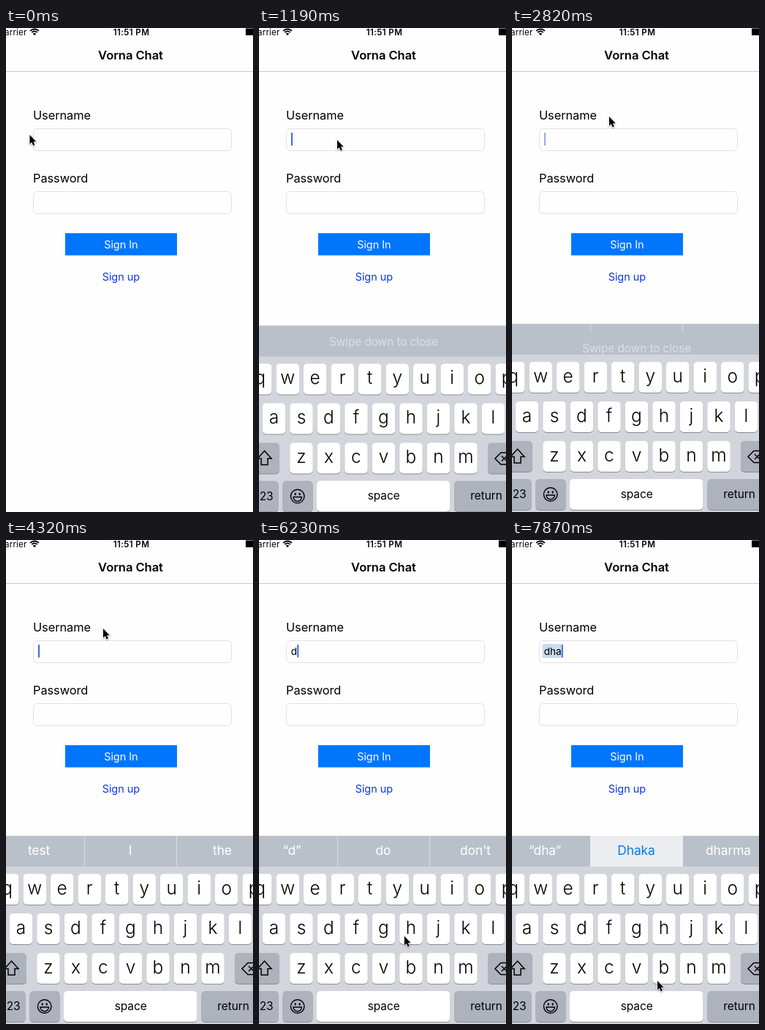
Recreate the animation shown at these times as an HTML page with a canvas. Size 338 by 661 pixels, loop 8000 ms.

```html
<!DOCTYPE html>
<html lang="en">
<head>
<meta charset="utf-8">
<title>Sign in</title>
<style>
html, body { margin: 0; width: 100%; height: 100%; overflow: hidden; background: #fefefe; }
canvas { display: block; }
</style>
</head>
<body>
<canvas id="stage" width="338" height="661"></canvas>
<script>
const ctx = document.getElementById('stage').getContext('2d');
const LOOP = 8000, STEP = 148.5;
const BAR = '#bac0c9', BOARD = '#d2d5db', DARK = '#adb2bd';

// Pointer stops: step, x, y
const PATH = [
  [0, 32.5, 146], [2, 107, 153], [9, 107, 153], [13, 133, 121], [29, 133, 121],
  [31, 146, 160], [36, 98, 516], [37, 95, 526], [39, 95, 526], [42, 199, 541],
  [45, 199, 541], [48, 22, 528], [49, 22, 528], [52, 198, 601], [53, 199, 602]
];

// Typing: step, field text, suggestions
const TYPING = [
  [0, '', ['test', 'I', 'the']],
  [38, 'd', ['“d”', 'do', "don't"]],
  [45, 'dh', ['“dh”', 'do', 'dharma']],
  [49, 'dha', ['“dha”', 'Dhaka', 'dharma']]
];

const clamp = v => Math.max(0, Math.min(1, v));

function rect(x, y, w, h, color) {
  ctx.fillStyle = color;
  ctx.fillRect(x, y, w, h);
}

function text(str, x, y, size, { color = '#000', weight = 400, align = 'center', spacing = -0.005 } = {}) {
  ctx.font = `${weight} ${size}px Inter, "Liberation Sans", sans-serif`;
  ctx.letterSpacing = size * spacing + 'px';
  ctx.textAlign = align;
  ctx.fillStyle = color;
  ctx.fillText(str, x, y);
}

function poly(points, close = true) {
  ctx.beginPath();
  points.forEach(([x, y]) => ctx.lineTo(x, y));
  if (close) ctx.closePath();
}

function line(points, width, close) {
  poly(points, close);
  ctx.strokeStyle = '#000';
  ctx.lineWidth = width;
  ctx.stroke();
}

function box(x, y, w, h, r) {
  ctx.beginPath();
  ctx.roundRect(x, y, w, h, r);
}

function statusBar() {
  text('Carrier', 28.5, 9.5, 11.6, { align: 'right', spacing: 0.015 });
  text('11:51 PM', 171.5, 9.5, 11.6, { weight: 600, spacing: 0.03 });
  ctx.strokeStyle = '#000';
  ctx.lineWidth = 1.8;
  for (const r of [5, 8]) {
    ctx.beginPath();
    ctx.arc(39, 9.5, r, -Math.PI * 0.76, -Math.PI * 0.24);
    ctx.stroke();
  }
  ctx.fillStyle = '#000';
  ctx.beginPath();
  ctx.moveTo(39, 10);
  ctx.arc(39, 10, 3, -Math.PI * 0.76, -Math.PI * 0.24);
  ctx.fill();
  rect(328, 0.5, 10, 9.5, '#000');
}

function field(label, y) {
  text(label, 37, y - 12.4, 16.4, { align: 'left' });
  box(37.5, y + 0.5, 271, 30, 5);
  ctx.fillStyle = '#fefefe';
  ctx.fill();
  ctx.strokeStyle = '#e1e1e1';
  ctx.lineWidth = 1;
  ctx.stroke();
}

function form() {
  statusBar();
  text('Vorna Chat', 170.5, 43, 16.6, { weight: 600 });
  rect(0, 59, 338, 1, '#c9c9ca');
  field('Username', 137);
  field('Password', 223);
  rect(81, 280.2, 153, 30.3, '#0076ff');
  text('Sign In', 157.3, 300.7, 14.5, { color: '#fff' });
  text('Sign up', 157.3, 344.7, 14.5, { color: '#0b35f5' });
}

function caretAlpha(t) {
  const p = (t - 2320 + 5 * 1000) % 1000;
  return p < 430 ? 1 - clamp(p / 150) : clamp((p - 430) / 130);
}

function entry(str, selected, alpha) {
  if (selected) rect(41.5, 142, 27.5, 19, '#c9dcf2');
  text(str, 43.7, 157, 13.6, { align: 'left' });
  const x = 44 + (str ? ctx.measureText(str).width : 0);
  ctx.globalAlpha = alpha;
  rect(x, 143, 2, 17.5, '#4064e6');
  ctx.globalAlpha = 1;
}

function key(x, y, w, color = '#fff') {
  box(x, y + 1, w, 42, 5);
  ctx.fillStyle = '#898c92';
  ctx.fill();
  box(x, y, w, 42, 5);
  ctx.fillStyle = color;
  ctx.fill();
}

function letters(row, x, y) {
  [...row].forEach((ch, i) => {
    const left = x + i * 37.5;
    key(left, y, 31.5);
    text(ch, left + 15.7, y + 27.8, 24.5, { weight: 300, spacing: 0 });
  });
}

function smiley(x, y) {
  ctx.strokeStyle = ctx.fillStyle = '#000';
  ctx.lineWidth = 1.4;
  ctx.beginPath();
  ctx.arc(x, y, 9.3, 0, 7);
  ctx.stroke();
  for (const dx of [-3, 3]) {
    ctx.beginPath();
    ctx.ellipse(x + dx, y - 3, 1.2, 1.8, 0, 0, 7);
    ctx.fill();
  }
  ctx.beginPath();
  ctx.arc(x, y + 1, 5.8, 0, Math.PI);
  ctx.closePath();
  ctx.stroke();
}

function suggestions(words, k) {
  const lit = k >= 52;
  const drop = k === 19 ? -30 : k === 20 ? -8 : 0;
  ctx.translate(0, drop);
  if (lit) rect(107, 0, 127, 42, '#ebedf0');
  else for (const x of [107, 233]) rect(x, 0, 1, 42, '#d6dadf');
  words.forEach((word, i) => {
    const color = i === 1 && k >= 53 ? '#0a7aec' : '#fff';
    text(word, [45, 170, 296][i], 26, 17.4, { color });
  });
  ctx.translate(0, -drop);
}

function bar(words, k) {
  ctx.save();
  rect(0, 0, 338, 42, BAR);
  ctx.beginPath();
  ctx.rect(0, 0, 338, 42);
  ctx.clip();
  if (k < 21) {
    const slide = k === 19 ? 11.5 : k === 20 ? 33 : 0;
    text('Swipe down to close', 170.5, 27 + slide, 15.4, { color: '#dcdfe3' });
  }
  if (k >= 19) suggestions(words, k);
  ctx.restore();
}

function keyboard(top, words, k) {
  ctx.save();
  ctx.translate(0, top);
  rect(0, 0, 338, 260, BOARD);
  bar(words, k);
  letters('qwertyuiop', -14, 52);
  letters('asdfghjkl', 4.75, 106);
  letters('zxcvbnm', 42.25, 160);

  key(-14, 160, 42, DARK);
  line([[7.5, 171], [17, 181.5], [12, 181.5], [12, 190], [3, 190], [3, 181.5], [-2, 181.5]], 1.5);
  key(313, 160, 42, DARK);
  line([[323, 181.5], [331, 173.5], [346, 173.5], [346, 189.5], [331, 189.5]], 1.5);
  line([[332, 178], [339, 185]], 1.5, false);
  line([[339, 178], [332, 185]], 1.5, false);

  key(-14, 212, 40.5, DARK);
  text('123', 19.5, 238, 15.5, { align: 'right' });
  key(32.5, 212, 41, DARK);
  smiley(52.7, 233);
  key(79, 212, 182.5);
  text('space', 170.7, 237.5, 15.5);
  key(267.5, 212, 90, DARK);
  text('return', 311, 237.5, 15.5);
  ctx.restore();
}

function pointer(k) {
  const i = Math.max(1, PATH.findIndex(p => p[0] >= k));
  const [k0, x0, y0] = PATH[i - 1], [k1, x1, y1] = PATH[i];
  const u = (k - k0) / (k1 - k0), e = u * u * (3 - 2 * u);
  ctx.save();
  ctx.translate(x0 + (x1 - x0) * e, y0 + (y1 - y0) * e);
  ctx.scale(0.86, 0.9);
  poly([[0, 0], [0, 14], [3.2, 11.2], [5.4, 16.2], [8, 15.1], [5.8, 10.3], [10, 10]]);
  ctx.shadowColor = 'rgba(0,0,0,.35)';
  ctx.shadowBlur = 2;
  ctx.shadowOffsetY = 1;
  ctx.strokeStyle = '#fff';
  ctx.lineWidth = 1.6;
  ctx.stroke();
  ctx.shadowColor = 'transparent';
  ctx.fillStyle = '#000';
  ctx.fill();
  ctx.restore();
}

function draw(now) {
  const k = Math.floor((now % LOOP + 8) / STEP);
  const [, typed, words] = TYPING.filter(s => s[0] <= k).pop();
  rect(0, 0, 338, 661, '#fefefe');
  form();
  if (k >= 6) {
    entry(typed, k >= 52, caretAlpha(k * STEP));
    keyboard(404 + 130 * 0.14 ** (k - 6), words, k);
  }
  pointer(k);
}

const start = performance.now();
function tick() {
  draw(performance.now() - start);
  requestAnimationFrame(tick);
}
tick();
</script>
</body>
</html>
```
